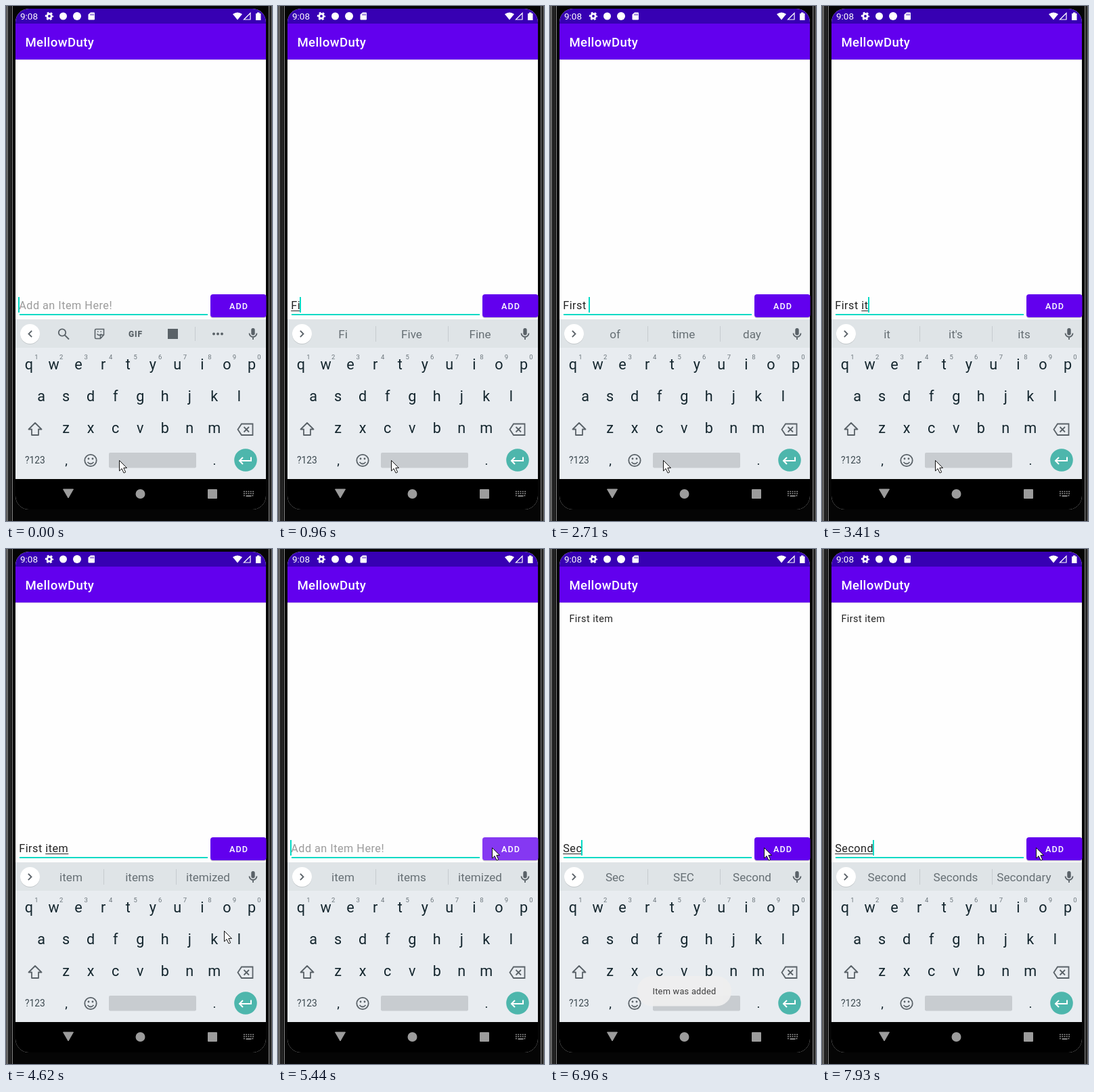
An HTML page that plays this animation: 393x761 px, repeating every 8000 ms.

```html
<!DOCTYPE html>
<html lang="en">
<head>
<meta charset="utf-8">
<title>To-do list demo</title>
<style>
  html, body { margin: 0; width: 100%; height: 100%; overflow: hidden; background: #000; }
  #stage { position: relative; width: 393px; height: 761px; overflow: hidden; font-family: Roboto, sans-serif; }
  svg { position: absolute; left: 0; top: 0; }
  text { font-family: Roboto, sans-serif; }
  .mid { text-anchor: middle; }
  .line { fill: none; stroke: #5a6268; stroke-width: 1.8; }
  .sug { font-size: 17.1px; fill: #666f74; text-anchor: middle; }
  .sug.bold { font-weight: 700; fill: #000; }
  .edit { position: absolute; left: 19.2px; top: 430px; height: 24px; font-size: 16.2px; line-height: 26px;
          letter-spacing: .506px; white-space: pre; color: #222; }
  .edit u { text-decoration-thickness: 1px; text-underline-offset: 1.5px; text-decoration-skip-ink: none; }
  .hint { color: #9b9b9b; }
  #caret { position: absolute; top: 0; width: 2px; height: 23px; margin-left: -1px; background: #03dac5; }
</style>
</head>
<body>
<div id="stage">
  <svg width="393" height="761" viewBox="0 0 393 761">
    <defs>
      <linearGradient id="rim">
        <stop offset="0" stop-color="#777"/><stop offset=".22" stop-color="#3a3a3a"/>
        <stop offset=".4" stop-color="#161616"/><stop offset=".7" stop-color="#2a2a2a"/>
        <stop offset="1" stop-color="#0a0a0a"/>
      </linearGradient>
      <clipPath id="screen"><rect x="14" y="4" width="370" height="740" rx="20"/></clipPath>
    </defs>

    <!-- phone body -->
    <rect width="393" height="761" fill="#050505"/>
    <rect width="9" height="761" fill="url(#rim)"/>
    <path d="M2.5 0V761M9.5 0V761M388.5 0V761" stroke="#858585"/>
    <rect x="389" width="4" height="761" fill="#262626"/>
    <path d="M392.5 0V761" stroke="#666"/>

    <g clip-path="url(#screen)">
      <rect x="14" y="4" width="370" height="740" fill="#fefefe"/>
      <rect x="14" y="79" width="370" height="1" fill="#d9d0e6"/>
      <rect x="14" y="26" width="370" height="53" fill="#6200ee"/>
      <rect x="14" y="4" width="370" height="22" fill="#3700b3"/>
      <rect x="14" y="463" width="370" height="236" fill="#e8ecf0"/>
      <rect x="14" y="463" width="370" height="42" fill="#dfe4e7"/>
      <rect x="14" y="699" width="370" height="45" fill="#000"/>
    </g>

    <!-- status bar -->
    <g fill="#fff">
      <text x="21" y="20" font-size="13.5">9:08</text>
      <circle cx="64" cy="15" r="3.3" fill="none" stroke="#fff" stroke-width="2.8"/>
      <circle cx="64" cy="15" r="5.3" fill="none" stroke="#fff" stroke-width="1.8" stroke-dasharray="2.8 2.75" stroke-dashoffset="1.4"/>
      <circle cx="84.5" cy="15" r="5.5"/>
      <circle cx="105" cy="15" r="6"/>
      <path d="M125 9.5h5q1 0 1 1v9q0 1-1 1h-7.500q-1 0-1-1v-7z"/>
      <path d="M125.300 11.500v2.500M127.300 11.500v2.500M129.300 11.500v2.500" stroke="#3700b3" stroke-width=".9"/>
      <path d="M335 12q7-5 14 0l-7 8.500z"/>
      <path d="M351.500 20L361 10.500V20z" fill="none" stroke="#fff" stroke-width="1.2"/>
      <path d="M369 11h2v-1.500h3.500V11h2v10H369z"/>
    </g>
    <text x="28.400" y="60" font-size="18.600" font-weight="500" letter-spacing=".4" fill="#fff">MellowDuty</text>
    <text id="item" x="28.400" y="107.500" font-size="14.400" letter-spacing=".45" fill="#222">First item</text>

    <!-- input row -->
    <rect x="20" y="455" width="278" height="2" fill="#03dac5"/>
    <rect x="302" y="427.500" width="82.500" height="34" rx="4" fill="#000" opacity=".18"/>
    <rect x="302" y="426" width="82.500" height="34" rx="4" fill="#6200ee"/>
    <rect id="press" x="302" y="426" width="82.500" height="34" rx="4" fill="#fff"/>
    <text x="344" y="448" class="mid" font-size="12.600" font-weight="500" letter-spacing="1.100" fill="#fff">ADD</text>

    <!-- suggestion strip -->
    <circle cx="35.500" cy="485.500" r="14.500" opacity=".12"/>
    <circle cx="35.500" cy="484.500" r="14.500" fill="#fff"/>
    <path id="chevron" class="line" stroke-linecap="square"/>
    <g id="tools">
      <g class="line">
        <circle cx="83" cy="482.500" r="5.200"/>
        <path d="M87 486.500l6 6"/>
        <path d="M133 477.500h11.500v8.500l-5 5.500H133q-1.500 0-1.500-1.500v-11q0-1.500 1.500-1.500M144.500 486h-5v5" stroke-width="1.600"/>
        <path d="M134.500 484.500q3.300 4 6.500 0M135 481.300h1.500M139.500 481.300h1.500" stroke-width="1.500"/>
        <path d="M279.500 474v21" stroke="#c6cbcf" stroke-width="1"/>
      </g>
      <text x="191.500" y="488.500" class="mid" font-size="12" font-weight="900" letter-spacing=".8" fill="#5a6268">GIF</text>
      <g fill="#5a6268">
        <rect x="239" y="477" width="15" height="15"/>
        <circle cx="307" cy="484.500" r="2"/><circle cx="313" cy="484.500" r="2"/><circle cx="319" cy="484.500" r="2"/>
      </g>
    </g>
    <g id="words">
      <path d="M144.500 473v23M251.500 473v23" stroke="#c6cbcf"/>
      <text class="sug" x="96" y="491"/><text class="sug" x="197.500" y="491"/><text class="sug" x="298.500" y="491"/>
    </g>
    <rect x="362.300" y="476" width="5.400" height="10.500" rx="2.700" fill="#5a6268"/>
    <path class="line" stroke-width="1.500" d="M359.500 483.500a5.500 5.500 0 0 0 11 0M365 489v4"/>

    <!-- keyboard -->
    <g id="keys"/>
    <path class="line" d="M43 616l9.500 9.500h-4.500V634H38v-8.500h-4.500z" stroke-linejoin="round"/>
    <path class="line" d="M348 617.500h16.500v16.500H348l-5.500-8.250zM351.500 622l7.500 7.500M359 622l-7.500 7.500"/>
    <circle class="line" cx="125" cy="671.500" r="8.700"/>
    <path class="line" d="M120.500 674q4.500 5 9 0" stroke-width="1.600"/>
    <circle cx="122" cy="669" r="1.400" fill="#5a6268"/><circle cx="128" cy="669" r="1.400" fill="#5a6268"/>
    <rect x="152" y="660" width="129" height="22.500" rx="2" fill="#c8ccd0"/>
    <circle cx="354" cy="671" r="16.800" fill="#4db6ac"/>
    <path d="M362 666.500v5.500h-16M350 667l-5 5 5 5" fill="none" stroke="#fff" stroke-width="2"/>

    <!-- navigation bar -->
    <g fill="#9c9c9c">
      <path d="M84.500 714h15L92 727z" stroke="#9c9c9c" stroke-linejoin="round"/>
      <circle cx="198.500" cy="721" r="7"/>
      <rect x="298" y="714" width="14" height="14" rx="1"/>
      <path d="M351 717.500h15M351 720.500h15M351 723.500h2.500M363.500 723.500h2.500" stroke="#9c9c9c" stroke-width="1.700" stroke-dasharray="1.800 1.500"/>
      <path d="M354.500 724h8" stroke="#9c9c9c" stroke-width="1.700"/>
    </g>
  </svg>

  <div class="edit"><span id="done"></span><u id="word"></u><i id="caret"></i></div>
  <div class="edit hint" id="hint">Add an Item Here!</div>

  <svg width="393" height="761" viewBox="0 0 393 761">
    <g id="toast">
      <rect x="129" y="631" width="139" height="44.500" rx="22" fill="#efefef"/>
      <text x="198.500" y="658" class="mid" font-size="12.800" letter-spacing=".25" fill="#333">Item was added</text>
    </g>
    <path id="mouse" d="M.5.5v15.500l3.600-3.400 3 6.400 2.600-1.200-2.900-6.200h4.700z" fill="#fff" stroke="#111" stroke-linejoin="round"/>
  </svg>
</div>

<script>
const LOOP = 8000;
const $ = id => document.getElementById(id);
const sugs = [...document.querySelectorAll('.sug')];

// keyboard letters
const PITCH = 36.55;
let keys = '';
const key = (s, x, y, size = 21.600, fill = '#14262e') => {
  keys += `<text class="mid" x="${x}" y="${y}" font-size="${size}" fill="${fill}">${s}</text>`;
};
const row = (letters, x, y) => [...letters].forEach((c, i) => key(c, x + i * PITCH, y));
row('qwertyuiop', 34, 536.500);
row('asdfghjkl', 52, 584);
row('zxcvbnm', 88.500, 631);
[...'1234567890'].forEach((c, i) => key(c, 45 + i * PITCH, 521.500, 9.500, '#6b757b'));
key('?123', 43, 676, 13.800, '#3a474e');
key(',', 89, 677.500, 19);
key('.', 308, 677.500, 19);
$('keys').innerHTML = keys;

// each step changes part of the state; typing always shows the caret
const type = (word, words, done = '') => ({ done, word, words, caret: 1, bold: 0 });
const steps = [
  [0, { ...type('', ''), mouse: [167, 671], press: 0, toast: 0, item: 0 }],
  [560, type('F', 'F For')],
  [690, { words: 'F For Food' }],
  [830, type('Fi', 'F For Food')],
  [960, { words: 'Fi Five Fine' }],
  [1540, { caret: 0 }],
  [1690, type('Fir', 'Fir First Fire')],
  [1970, { ...type('Firs', 'Firs First Firstly'), bold: 1 }],
  [2260, type('First', 'First Firsts First-time')],
  [2710, type('', 'of time day', 'First ')],
  [3120, type('i', 'of time day', 'First ')],
  [3270, { words: 'i is in' }],
  [3410, type('it', "it it's its", 'First ')],
  [3660, { ...type('ite', 'ite item its', 'First '), bold: 1 }],
  [3950, type('item', 'item items itemized', 'First ')],
  [4370, { mouse: [212, 646] }],
  [4500, { mouse: [284, 597], caret: 0 }],
  [4620, { mouse: [322, 564] }],
  [4740, { mouse: [328, 512] }],
  [4930, { mouse: [321, 458], caret: 1 }],
  [5130, { mouse: [316, 441] }],
  [5320, { press: .12 }],
  [5440, { ...type('', 'item items itemized'), press: .22 }],
  [5580, { item: 1, words: '', press: .2, toast: .25 }],
  [5700, { press: .1, toast: .65 }],
  [5830, { press: 0, toast: .95 }],
  [5970, { caret: 0 }],
  [6410, type('S', 'S So She')],
  [6680, type('Se', 'Se See Seen')],
  [6960, type('Sec', 'Sec SEC Second')],
  [7230, type('Seco', 'Seco Second Seconds')],
  [7500, type('Secon', 'Secon Second Seconds')],
  [7650, { toast: .45 }],
  [7780, type('Second', 'Second Seconds Secondary')],
  [7930, { toast: 0 }],
];

let state = {};
const states = steps.map(([, change]) => (state = { ...state, ...change }));

function show(s) {
  $('done').textContent = s.done;
  $('word').textContent = s.word;
  $('caret').style.opacity = s.caret;
  $('hint').style.visibility = s.done + s.word ? 'hidden' : 'visible';
  const open = s.words !== '';
  $('words').style.display = open ? '' : 'none';
  $('tools').style.display = open ? 'none' : '';
  $('chevron').setAttribute('d', open ? 'M33.500 480.500l4 4-4 4' : 'M37.500 480.500l-4 4 4 4');
  const words = s.words.split(' ');
  sugs.forEach((el, i) => { el.textContent = words[i] || ''; });
  sugs[1].classList.toggle('bold', !!s.bold);
  $('press').style.opacity = s.press;
  $('toast').style.opacity = s.toast;
  $('item').style.opacity = s.item;
  $('mouse').setAttribute('transform', `translate(${s.mouse})`);
}

let shown = -1;
function tick() {
  const t = performance.now() % LOOP;
  let i = steps.length - 1;
  while (steps[i][0] > t) i--;
  if (i !== shown) show(states[shown = i]);
  requestAnimationFrame(tick);
}
tick();
</script>
</body>
</html>
```
